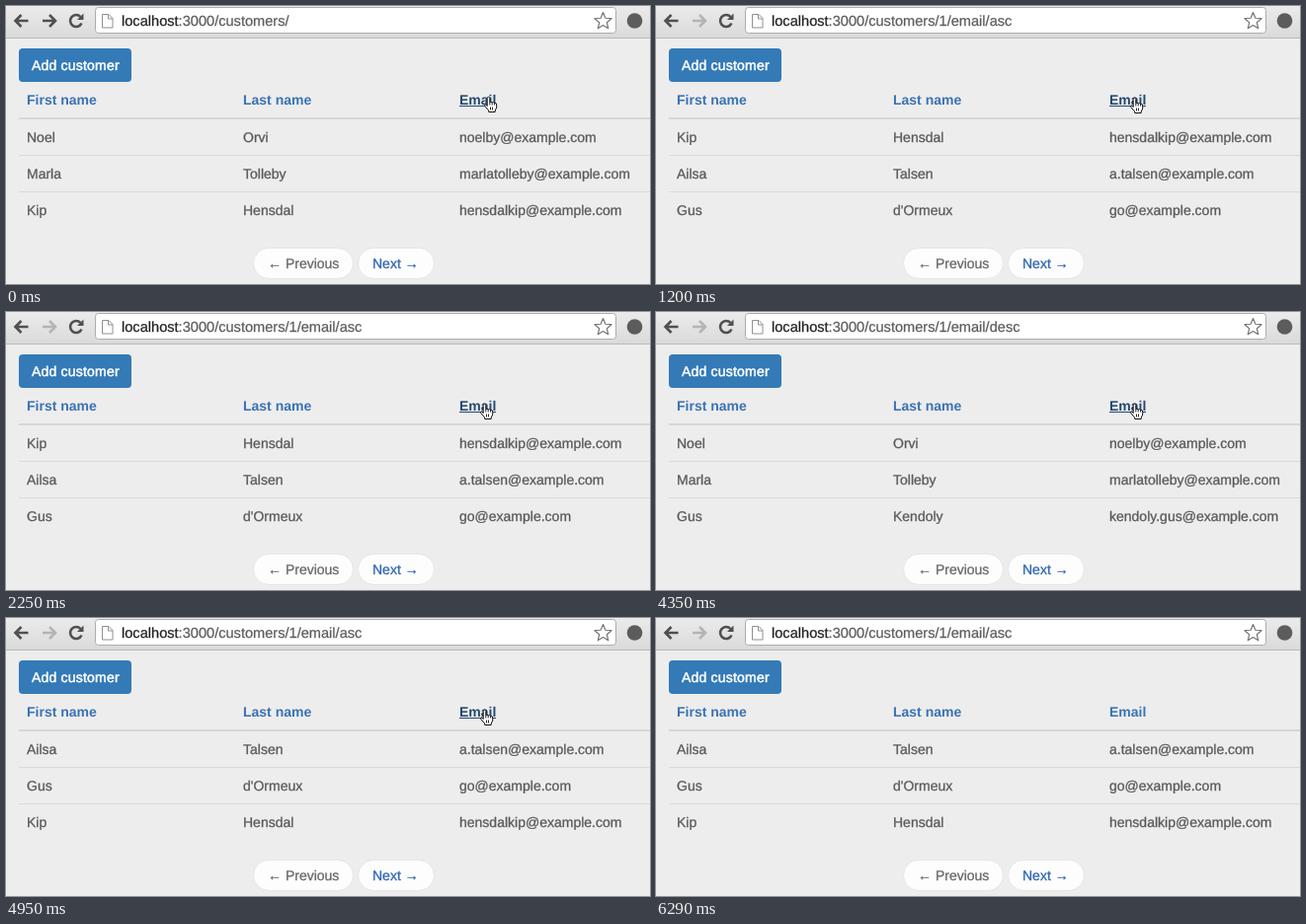
Write an HTML page that moves like this. It is 652x282 px and loops after 6590 ms.

```html
<!DOCTYPE html>
<html lang="en">
<head>
<meta charset="utf-8">
<title>Sortable customer table</title>
<style>
  html, body { margin: 0; width: 100%; height: 100%; overflow: hidden; background: #ededed; }
  svg { display: block; width: 652px; height: 282px; }
  text { font: 14px "Liberation Sans", Arial, sans-serif; fill: #5a5a5a; text-rendering: geometricPrecision; white-space: pre; }
  .cell text { stroke: #5a5a5a; stroke-width: .3px; }
  .head text { font-weight: bold; fill: #3a72b4; }
  .head .hover { fill: #23486f; }
  .url { font-size: 14.6px; fill: #5c5c5c; stroke: #5c5c5c; stroke-width: .25px; }
  .host { fill: #222; stroke: #222; }
  .button { fill: #fff; stroke: #fff; stroke-width: .5px; letter-spacing: .2px; }
  .pill { fill: #fdfdfd; stroke: #e6e6e6; }
  .prev { fill: #686868; stroke: #686868; stroke-width: .3px; }
  .next { fill: #3066b0; stroke: #3066b0; stroke-width: .3px; }
  .icon { fill: none; stroke: #505050; stroke-width: 2.6; }
  .off { stroke: #b4b4b4; }
</style>
</head>
<body>
<svg viewBox="0 0 652 282">
  <defs>
    <linearGradient id="bar" x2="0" y2="1">
      <stop stop-color="#ebebeb"/><stop offset="1" stop-color="#dadada"/>
    </linearGradient>
  </defs>
  <rect width="652" height="282" fill="#ededed"/>

  <!-- browser toolbar -->
  <rect width="652" height="32" fill="url(#bar)"/>
  <path d="M0 32.5H652" stroke="#bababa"/>
  <path class="icon" d="M22.500 15H10M15.500 9L9.500 15l6 6"/>
  <path class="icon" id="forward" d="M37 15H49.500M44 9l6 6-6 6"/>
  <path class="icon" d="M75.500 11A6 6 0 1 0 76.500 17.500"/>
  <path d="M78.500 7.500V14H72z" fill="#505050"/>
  <rect x="90.500" y="1.500" width="527" height="26" rx="3" fill="#fff" stroke="#adadad"/>
  <path d="M97.500 8.500h6.500l4 4v9.500h-10.500zM103.500 8.500v4.500h4.500" fill="#fff" stroke="#909090"/>
  <text class="url" x="117" y="20"><tspan class="host">localhost</tspan><tspan id="path"></tspan></text>
  <path id="star" fill="#fff" stroke="#777" stroke-width="1.200" stroke-linejoin="round"/>
  <circle cx="636.500" cy="15" r="7.800" fill="#5c5c5c"/>

  <!-- page -->
  <rect x="13" y="43" width="114" height="34" rx="4" fill="#337ab7"/>
  <text class="button" x="26" y="65">Add customer</text>
  <g class="head">
    <text x="21" y="100">First name</text>
    <text x="240" y="100">Last name</text>
    <text x="459" y="100" id="email">Email</text>
    <path id="underline" d="M459 101.500H496" stroke="#23486f"/>
  </g>
  <path d="M13 114H652" stroke="#d7d7d7" stroke-width="2"/>
  <path d="M13 151.500H652M13 188.500H652" stroke="#dadada"/>
  <g class="cell" id="rows"></g>
  <rect class="pill" x="250.500" y="245.500" width="101" height="31" rx="15.500"/>
  <rect class="pill" x="356.500" y="245.500" width="77" height="31" rx="15.500"/>
  <text class="prev" x="265" y="266">← Previous</text>
  <text class="next" x="371" y="266">Next →</text>

  <!-- pointers -->
  <g id="hand" stroke="#111" stroke-linejoin="round">
    <path fill="#fff" d="M4.200 10V2a1.300 1.300 0 0 1 2.600 0V6q1.200-.9 2.400.3 1.300-.6 2.300.6 2.200-.3 2.200 1.600v3l-1.500 3V16H5.700V14.500l-4-4.500q-.4-2 1.200-1.600z"/>
    <path fill="none" stroke-width=".9" d="M6.800 6v3M9.200 6.500v2.500M11.500 7v2M7.500 11v3M9.500 11v3"/>
  </g>
  <path id="beam" fill="none" stroke="#222" d="M.5 .5q3 0 3 2.500V13q0 2.500-3 2.500M6.500 .5q-3 0-3 2.500V13q0 2.500 3 2.500M2 10.500h3"/>
  <path id="arrow" fill="#111" stroke="#fff" d="M0 0V13l3-2.800 2 4.600 2-.9-2-4.500h4z"/>
</svg>
<script>
const $ = id => document.getElementById(id);
const LOOP = 6590;

const person = (first, last, mail) => [first, last, mail + "@example.com"];
const noel = person("Noel", "Orvi", "noelby");
const marla = person("Marla", "Tolleby", "marlatolleby");
const kip = person("Kip", "Hensdal", "hensdalkip");
const ailsa = person("Ailsa", "Talsen", "a.talsen");
const gusO = person("Gus", "d'Ormeux", "go");
const gusK = person("Gus", "Kendoly", "kendoly.gus");

// start time, path suffix, visible rows
const pages = [
  [0, "", [noel, marla, kip]],
  [1200, "1/email/asc", [kip, ailsa, gusO]],
  [3150, "1/email/desc", [noel, marla, gusK]],
  [4950, "1/email/asc", [ailsa, gusO, kip]]
];

// start time, pointer shape, position
const pointers = [
  [0, "hand", 483, 91.5],
  [150, "hand", 479, 92.5],
  [5400, "beam", 544, 167],
  [5550, "arrow", 597.5, 275],
  [5690, "arrow", 599.5, 281],
  [5840, "none", 0, 0]
];

const star = Array.from({ length: 10 }, (_, i) => {
  const r = i % 2 ? 4 : 9, a = i * Math.PI / 5;
  return [604.5 + r * Math.sin(a), 15.5 - r * Math.cos(a)];
});
$("star").setAttribute("d", "M" + star.join("L") + "z");

const cells = Array.from({ length: 9 }, (_, i) => {
  const cell = document.createElementNS($("rows").namespaceURI, "text");
  cell.setAttribute("x", 21 + i % 3 * 219);
  cell.setAttribute("y", 138 + Math.floor(i / 3) * 37);
  return $("rows").appendChild(cell);
});

const at = (steps, t) => steps.filter(s => s[0] <= t).pop();
const show = (id, on) => $(id).style.display = on ? "" : "none";
let shown;

function draw(now) {
  const t = now % LOOP;
  const page = at(pages, t);
  if (page !== shown) {
    shown = page;
    $("path").textContent = ":3000/customers/" + page[1];
    $("forward").classList.toggle("off", page !== pages[0]);
    page[2].flat().forEach((s, i) => cells[i].textContent = s);
  }
  const [, shape, x, y] = at(pointers, t);
  for (const id of ["hand", "beam", "arrow"]) {
    show(id, id === shape);
    $(id).setAttribute("transform", `translate(${x} ${y})`);
  }
  const hover = t < 5990;
  $("email").classList.toggle("hover", hover);
  show("underline", hover);
}

const start = performance.now();
function tick() {
  draw(performance.now() - start);
  requestAnimationFrame(tick);
}
tick();
</script>
</body>
</html>
```
